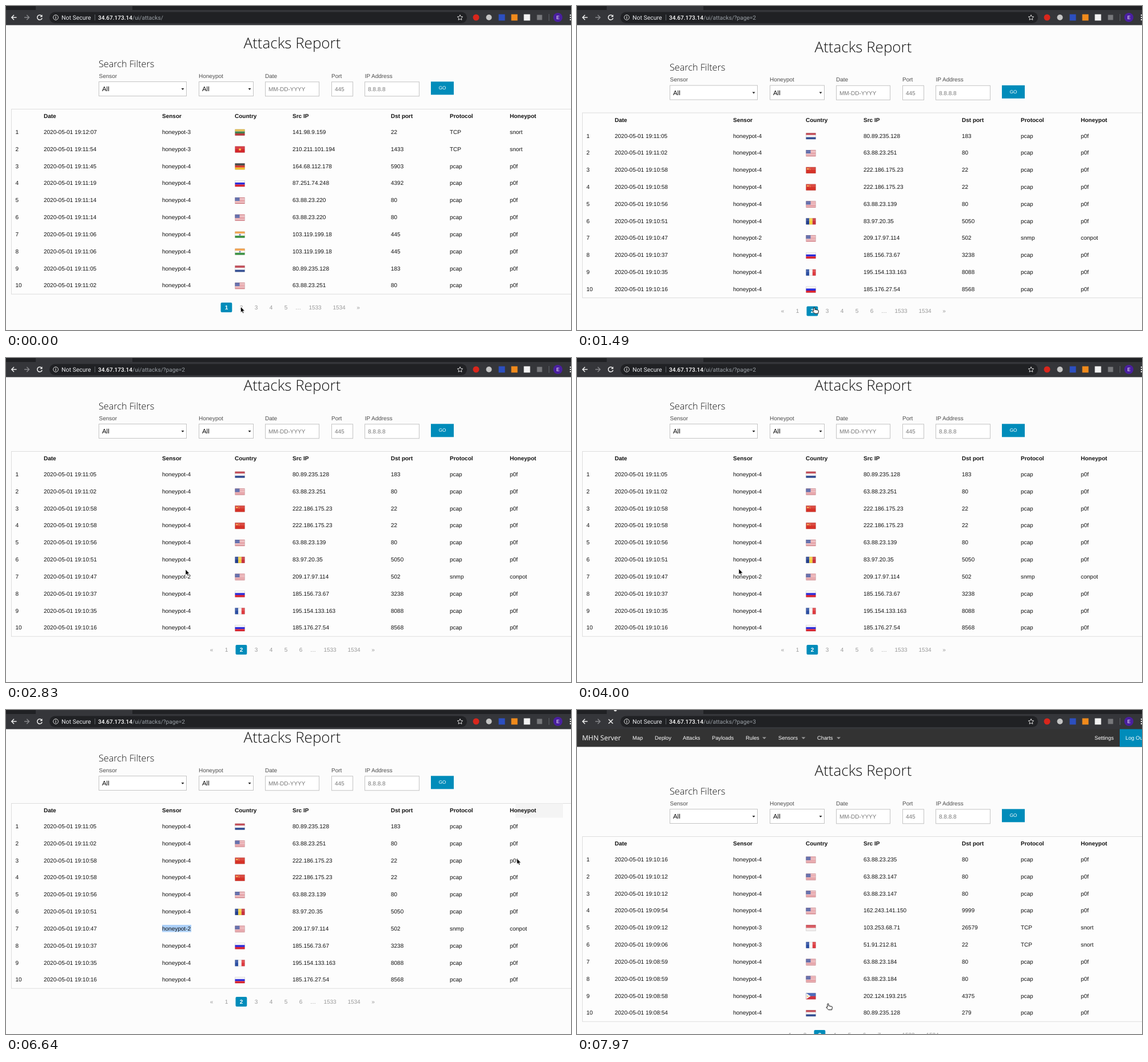
Write an HTML page that moves like this. It is 988 by 567 pixels and loops after 8000 ms.

```html
<!DOCTYPE html>
<html lang="en">
<head>
<meta charset="utf-8">
<title>Attacks Report</title>
<style>
  html, body { margin: 0; height: 100%; overflow: hidden; background: #fcfcfc; }
  svg { display: block; width: 100vw; height: 100vh; }
  text { font: 10px "Liberation Sans", Arial, sans-serif; fill: #111; white-space: pre; text-rendering: geometricPrecision; }
  .b { font-weight: 700; }
  .head { font: 300 26px "Open Sans", sans-serif; fill: #111; }
  .sub { font-size: 16.2px; }
  .label { fill: #4d4d4d; }
  .hint { fill: #777; }
  .nav { font-size: 9.3px; fill: #fff; }
  .brand { font: 12px "Open Sans", sans-serif; fill: #fff; }
  .mid { text-anchor: middle; }
  .num { fill: #999; }
  .white { fill: #fff; }
  .url { font: 10.1px Roboto, sans-serif; fill: #9aa0a6; }
</style>
</head>
<body>
<svg viewBox="0 0 988 567" xmlns="http://www.w3.org/2000/svg">
  <g id="pages"></g>
  <g id="chrome"></g>
  <path id="cursor"/>
</svg>
<script>
const $ = id => document.getElementById(id);
const text = (x, y, s, cls = "") => `<text x="${x}" y="${y}" class="${cls}">${s}</text>`;
const rect = (x, y, w, h, fill, more = "") =>
  `<rect x="${x}" y="${y}" width="${w}" height="${h}" fill="${fill}" ${more}/>`;
const path = (d, stroke, more = "") =>
  `<path d="${d}" fill="none" stroke="${stroke}" stroke-width="1.5" ${more}/>`;
const solid = (d, fill) => `<path d="${d}" fill="${fill}"/>`;
const disc = (x, y, r, fill) => `<circle cx="${x}" cy="${y}" r="${r}" fill="${fill}"/>`;

// time, sensor, country, source, port, protocol, honeypot
const tables = [`
19:12:07 3 lt 141.98.9.159 22 TCP snort
19:11:54 3 vn 210.211.101.194 1433 TCP snort
19:11:45 4 de 164.68.112.178 5903 pcap p0f
19:11:19 4 ru 87.251.74.248 4392 pcap p0f
19:11:14 4 us 63.88.23.220 80 pcap p0f
19:11:14 4 us 63.88.23.220 80 pcap p0f
19:11:06 4 in 103.119.199.18 445 pcap p0f
19:11:06 4 in 103.119.199.18 445 pcap p0f
19:11:05 4 nl 80.89.235.128 183 pcap p0f
19:11:02 4 us 63.88.23.251 80 pcap p0f`, `
19:11:05 4 nl 80.89.235.128 183 pcap p0f
19:11:02 4 us 63.88.23.251 80 pcap p0f
19:10:58 4 cn 222.186.175.23 22 pcap p0f
19:10:58 4 cn 222.186.175.23 22 pcap p0f
19:10:56 4 us 63.88.23.139 80 pcap p0f
19:10:51 4 ro 83.97.20.35 5050 pcap p0f
19:10:47 2 us 209.17.97.114 502 snmp conpot
19:10:37 4 ru 185.156.73.67 3238 pcap p0f
19:10:35 4 fr 195.154.133.163 8088 pcap p0f
19:10:16 4 ru 185.176.27.54 8568 pcap p0f`, `
19:10:16 4 us 63.88.23.235 80 pcap p0f
19:10:12 4 us 63.88.23.147 80 pcap p0f
19:10:12 4 us 63.88.23.147 80 pcap p0f
19:09:54 4 us 162.243.141.150 9999 pcap p0f
19:09:12 3 id 103.253.68.71 26579 TCP snort
19:09:06 3 fr 51.91.212.81 22 TCP snort
19:08:59 4 us 63.88.23.184 80 pcap p0f
19:08:59 4 us 63.88.23.184 80 pcap p0f
19:08:58 4 ph 202.124.193.215 4375 pcap p0f
19:08:54 4 nl 80.89.235.128 279 pcap p0f`];

const W = 17, H = 11;
const rows = (...c) => c.map((f, i) => rect(0, i * H / c.length, W, H / c.length, f)).join("");
const cols = (...c) => c.map((f, i) => rect(i * W / c.length, 0, W / c.length, H, f)).join("");
const star = (x, y, r) => solid("M" + [...Array(10)].map((_, i) => {
  const a = i * Math.PI / 5, k = i % 2 ? r * .4 : r;
  return `${x + k * Math.sin(a)} ${y - k * Math.cos(a)}`;
}).join("L") + "Z", "#ffe04a");
const bars = [...Array(9)].map((_, i) => i % 2 ? "#f3e3e4" : "#d9616a");
const flags = {
  lt: rows("#e5b83c", "#3f7d4b", "#b8393c"),
  vn: rows("#d3262c") + star(8.5, 5.6, 3),
  de: rows("#333", "#d33024", "#f3bd2c"),
  ru: rows("#f6f6f6", "#2424d8", "#dc2430"),
  us: rows(...bars) + rect(0, 0, 8, 6, "#5360a4"),
  in: rows("#f19a3e", "#f5f5f5", "#3d9444") + disc(8.5, 5.5, 1.5, "#6975b5"),
  nl: rows("#bd3945", "#f5f5f5", "#355095"),
  cn: rows("#d63228") + star(3.3, 3.3, 2) + disc(6.5, 2, .6, "#ffe04a") + disc(7, 4.5, .6, "#ffe04a"),
  ro: cols("#24408f", "#f2cf3c", "#c9323c"),
  fr: cols("#2c4fa3", "#f5f5f5", "#de3b40"),
  id: rows("#d2464f", "#f2eeee"),
  ph: rows("#3657b3", "#cf3340") + solid("M0 0L8 5.5L0 11Z", "#f5f5f5") + disc(2.8, 5.5, 1.2, "#e8c446")
};
const flag = (code, y) => `<g transform="translate(400.5 ${y})">${flags[code]}` +
  rect(0, 0, W, 5, "#fff", 'opacity=".12"') +
  rect(.25, .25, W - .5, H - .5, "none", 'stroke="#000" stroke-opacity=".2" stroke-width=".5"') + "</g>";

const colX = [66, 273, 400, 501, 673, 776, 881];
const blue = "#008cba";

function navBar() {
  const items = { Map: 97, Deploy: 136, Attacks: 185, Payloads: 236, Rules: 295, Sensors: 352, Charts: 420, Settings: 905 };
  return rect(0, 33, 988, 31.5, "#333") + rect(949, 33, 39, 31.5, blue) +
    text(9, 53.3, "MHN Server", "brand") + text(959, 52.3, "Log Out", "nav") +
    Object.entries(items).map(([s, x]) => text(x, 52.3, s, "nav")).join("") +
    [327.5, 396, 457.5].map(x => solid(`M${x - 3.5} 47.5h7l-3.5 3.5z`, "#999")).join("");
}

function filters() {
  const labels = { Sensor: 162.5, Honeypot: 337, Date: 453, Port: 569, "IP Address": 627.5 };
  const box = (x, w, y) => rect(x + .5, y + .5, w - 1, 25, "#fff", 'stroke="#c4c4c4"');
  const select = (x, w) => box(x, w, 173) + `<text x="${x + 6}" y="190" style="font-size:11.4px;fill:#000">All</text>` +
    solid(`M${x + w - 9.5} 185h5l-2.5 3z`, "#222");
  const input = (x, w, s) => box(x, w, 173.3) + text(x + 6, 190, s, "hint");
  return text(500.5, 115, "Attacks Report", "head mid") + text(162, 147.7, "Search Filters", "head sub") +
    Object.entries(labels).map(([s, x]) => text(x, 166.5, s, "label")).join("") +
    select(162, 154) + select(337, 96) + input(453, 95, "MM-DD-YYYY") + input(569, 38, "445") +
    input(627, 96, "8.8.8.8") + rect(743, 173.3, 40, 23, blue) +
    `<text x="763" y="187.4" class="mid white" style="font-size:8.2px">GO</text>`;
}

function table(data) {
  const heads = ["Date", "Sensor", "Country", "Src IP", "Dst port", "Protocol", "Honeypot"];
  const body = data.trim().split("\n").map((line, i) => {
    const y = 265 + i * 29.83;
    const [time, sensor, code, ...rest] = line.split(" ");
    const cells = ["2020-05-01 " + time, "honeypot-" + sensor, "", ...rest];
    return text(16.5, y, i + 1) + flag(code, y - 8.3) +
      cells.map((s, c) => s && text(colX[c], y, s)).join("");
  });
  return heads.map((s, c) => text(colX[c], 237.3, s, "b")).join("") + body.join("");
}

function pager(page) {
  let x = [385.5, 359.5, 346.5][page - 1];
  const items = page > 1 ? ["«"] : [];
  for (let n = 1; n <= page + 4; n++) items.push(n);
  const put = s => {
    const on = s === page;
    return (on ? rect(x - 10, 560, 19.8, 17, blue, 'rx="2"') : "") +
      text(x, 571.9, s, on ? "mid b white" : "mid num");
  };
  let out = "";
  for (const s of items) { out += put(s); x += 26; }
  x -= 26;
  for (const [s, dx] of [["…", 21.5], [1533, 29.5], [1534, 42], ["»", 33.5]]) { x += dx; out += put(s); }
  return out;
}

$("pages").innerHTML = tables.map((data, i) => `<g>${navBar() + filters() +
  rect(9.5, 221.5, 990, 323.7, "#fdfdfd", 'stroke="#ddd"') +
  (i == 1 ? rect(273, 434, 51, 12.5, "#acd0f8", 'id="mark"') + rect(891, 221.5, 83, 25, "#f4f4f4", 'id="shade"') : "") +
  table(data) + pager(i + 1)}</g>`).join("");

$("chrome").innerHTML =
  rect(0, 0, 988, 33.5, "#35363a") + rect(0, 0, 52, 7, "#202124") + rect(221, 0, 767, 7, "#202124") +
  rect(76, 10.5, 730, 19.5, "#202124", 'rx="9.75"') +
  path("M18.5 20H10M14 15.8L9.8 20L14 24.2", "#eee") + path("M32 20h8.5M36.3 15.8L40.5 20L36.3 24.2", "#85868a") +
  path("M62.3 17.2A4.3 4.3 0 1 0 63.1 21.2", "#eee", 'id="reload"') + solid("M63.5 15v4.3h-4.3z", "#eee") +
  `<g id="stop">${rect(53, 13, 12, 14, "#35363a") + path("M55.2 16.2l7.6 7.6M62.8 16.2l-7.6 7.6", "#eee") + disc(67, 0, 2.5, "#ddd")}</g>` +
  `<circle cx="87" cy="20" r="4.4" fill="none" stroke="#ddd"/>` + rect(86.4, 19.2, 1.2, 3.3, "#ddd") + rect(86.4, 17.2, 1.2, 1.2, "#ddd") +
  `<text x="97" y="23.7" class="url" style="fill:#e8eaed;font-size:10.5px">Not Secure</text>` +
  rect(155, 15, 1, 10, "#5f6368") +
  `<text x="161" y="23.7" class="url"><tspan fill="#fff" font-weight="500">34.67.173.14</tspan>/ui/attacks/<tspan id="query"></tspan></text>` +
  `<path d="M794 15.5l1.4 3 3.3.4-2.4 2.2.6 3.3-2.9-1.6-2.9 1.6.6-3.3-2.4-2.2 3.3-.4z" fill="none" stroke="#ddd"/>` +
  disc(822, 20, 5.5, "#d9261c") + disc(844.5, 20, 5, "#c4c4c4") + rect(861.5, 14.5, 11, 11, "#2c4fc0") +
  rect(883.5, 14.5, 11, 11, "#f08a1c") + rect(905.5, 14.5, 11, 11, "#f2f2f2") + rect(928.5, 15.5, 9, 9, "#77787b") +
  rect(949, 14, 1, 12, "#5f6368") + disc(965, 20, 8, "#4a1fa0") +
  `<text x="965" y="23" class="mid white" style="font-size:8.5px">E</text>` +
  [16, 20, 24].map(y => disc(987, y, 1.2, "#eee")).join("");

const shapes = {
  arrow: ["M0 0V9.8L2.2 7.8L3.7 11.2L5.3 10.5L3.8 7.2H6.9Z", "#000", "#fff", .6],
  hand: ["M-1.1 1Q0-.6 1.1 1V4.2L6.4 5.3Q7.6 5.6 7.4 7L6.6 11.2H.8L-2.9 7.4Q-3.2 6-1.8 6.2L-1.1 6.8Z", "#fff", "#111", 1],
  beam: ["M-2 0Q0 0 0 1.5V9Q0 10.5-2 10.5M2 0Q0 0 0 1.5M2 10.5Q0 10.5 0 9M-1 6H1", "none", "#222", .9]
};

// start time, x, y, shape
const moves = [
  [0, 410.5, 526.5, "arrow"], [150, 413, 526, "hand"], [300, 415, 527, "hand"],
  [2230, 412, 515, "arrow"], [2380, 396, 478], [2530, 364, 425], [2680, 330, 384], [2830, 314, 370],
  [2970, 308, 360], [3120, 304, 353], [3260, 302, 350], [3410, 302.5, 351],
  [3700, 300, 354], [3850, 292, 361], [4000, 283, 369], [4140, 276, 375], [4290, 275, 377, "beam"],
  [4590, 277, 377], [4740, 300, 395, "arrow"], [4880, 312, 440], [5030, 320.5, 472], [5170, 390, 482], [5320, 441.5, 483],
  [5610, 442, 488], [5760, 442, 492],
  [6210, 530, 430], [6350, 760, 260], [6490, 905, 162], [6640, 893.5, 260],
  [6780, 760, 390], [6930, 590, 505], [7080, 480, 543], [7240, 444, 530], [7380, 439, 513.5, "hand"]
];
let shape;
for (const m of moves) shape = m[3] ||= shape;

const pageAt = [[0, 1], [740, 2], [7820, 3]];
const queryAt = [[0, ""], [590, "?page=2"], [7680, "?page=3"]];
const loadAt = [[0, false], [590, true], [1190, false], [7530, true]];
const scrollAt = [[0, 41], [740, 0], [1490, 34.5], [1640, 54], [1780, 58], [7820, 0]];
const at = (list, t) => list.findLast(e => e[0] <= t);
const show = (el, on) => el.style.display = on ? "" : "none";

const groups = [...$("pages").children];
const start = performance.now();

function draw(now) {
  const t = Math.max(0, now - start) % 8000;
  const page = at(pageAt, t)[1];
  groups.forEach((g, i) => show(g, i + 1 == page));
  $("pages").setAttribute("transform", `translate(0 ${-at(scrollAt, t)[1]})`);
  $("query").textContent = at(queryAt, t)[1];
  show($("stop"), at(loadAt, t)[1]);
  show($("mark"), t >= 4590);
  show($("shade"), t >= 6490);
  const [, x, y, kind] = at(moves, t);
  const [d, fill, stroke, width] = shapes[kind];
  const look = { d, fill, stroke, "stroke-width": width, transform: `translate(${x} ${y})` };
  for (const k in look) $("cursor").setAttribute(k, look[k]);
  requestAnimationFrame(draw);
}
draw(start);
</script>
</body>
</html>
```
